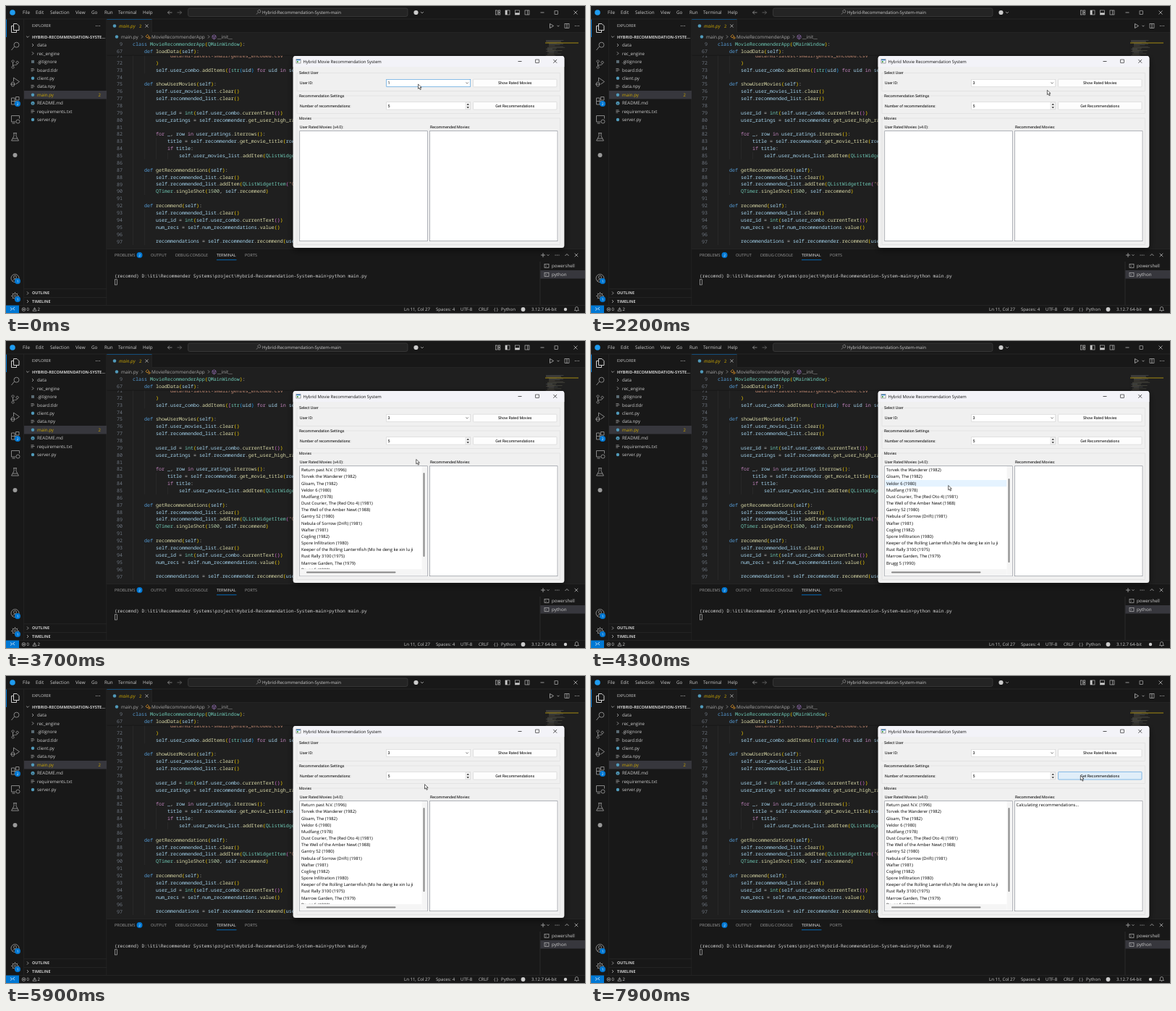
Animation, 800 px wide and 424 px high, one loop 8000 ms. Source, as an HTML page:

```html
<!DOCTYPE html>
<html lang="en">
<head>
<meta charset="utf-8">
<title>Recommender demo</title>
<style>
html, body { margin: 0; width: 100%; height: 100%; overflow: hidden; background: #181818; }
svg { display: block; width: 800px; height: 424px; }
text { white-space: pre; text-rendering: geometricPrecision; }
.ui { font-family: "Open Sans", "Noto Sans", sans-serif; }
.code { font-family: "Noto Sans Mono", "Liberation Mono", monospace; }
.form { font-family: Roboto, "Liberation Sans", sans-serif; }
</style>
</head>
<body>
<svg id="stage" viewBox="0 0 800 424" xmlns="http://www.w3.org/2000/svg"></svg>
<script>
const LOOP = 8000, STEP = 100;
const BLUE = '#0078d4', GREY = '#8c8c8c', LIGHT = '#cccccc', WARN = '#cca700';
const esc = s => String(s).replace(/&/g, '&amp;').replace(/</g, '&lt;').replace(/>/g, '&gt;');

// Drawing helpers; text is placed by the vertical centre of its capitals.
const rect = (x, y, w, h, fill, extra = '') =>
  `<rect x="${x}" y="${y}" width="${w}" height="${h}" fill="${fill}" ${extra}/>`;
const box = (x, y, w, h, fill, stroke, extra = '') =>
  rect(x, y, w, h, fill, `stroke="${stroke}" stroke-width=".6" ${extra}`);
const disc = (x, y, r, fill) => `<circle cx="${x}" cy="${y}" r="${r}" fill="${fill}"/>`;
const line = (d, stroke = LIGHT, width = .7, fill = 'none') =>
  `<path d="${d}" fill="${fill}" stroke="${stroke}" stroke-width="${width}"/>`;
const text = (x, y, s, size, fill = LIGHT, extra = '', cls = 'ui') =>
  `<text class="${cls}" x="${x}" y="${(y + size * .355).toFixed(2)}" font-size="${size}" fill="${fill}" ${extra}>${esc(s)}</text>`;
const form = (x, y, s, extra = '') => text(x, y, s, 5.3, '#000', extra, 'form');
const chevron = (x, y, c = LIGHT, r = 1.9) => line(`M${x - r} ${y - r / 2}l${r} ${r}l${r} ${-r}`, c);
const chevronRight = (x, y, c = LIGHT) => line(`M${x - 1} ${y - 2}l2 2l-2 2`, c);
const cross = (x, y, r, c = LIGHT) => line(`M${x - r} ${y - r}l${2 * r} ${2 * r}m0 ${-2 * r}l${-2 * r} ${2 * r}`, c);
const dots = (x, y) => [-2.4, 0, 2.4].map(d => disc(x + d, y, .6, LIGHT)).join('');
const badge = (x, y, n, r = 4) => disc(x, y, r, BLUE) + text(x, y, n, 4.8, '#fff', 'text-anchor="middle"');

function titleBar() {
  const menus = [[23, 'File'], [41, 'Edit'], [61, 'Selection'], [96, 'View'], [118, 'Go'],
    [136, 'Run'], [155, 'Terminal'], [189, 'Help']];
  const pane = x => box(x, 6, 6, 6, 'none', LIGHT);
  return rect(0, 0, 800, 18, '#181818') + rect(0, 17.7, 800, .6, '#2b2b2b') +
    disc(9, 9, 3.8, '#1f9cf0') +
    menus.map(([x, s]) => text(x, 9, s, 6.3)).join('') +
    line('M229.5 9h-6m2.5 -2.5l-2.5 2.5l2.5 2.5', '#aaa') +
    line('M236.5 9h6m-2.5 -2.5l2.5 2.5l-2.5 2.5', '#777') +
    box(251.5, 3, 303.5, 11.5, '#242424', '#454545', 'rx="2.5"') +
    line('M346 11.5l2 -2.3m.4 -.6a2 2 0 1 1 1.5 .7a2 2 0 0 1 -1.5 -.7', '#aaa', .6) +
    text(354, 9, 'Hybrid-Recommendation-System-main', 6.02) +
    disc(566.5, 9, 3.1, LIGHT) + chevron(575, 9) +
    box(676.5, 6, 2.5, 6, 'none', LIGHT) + box(680.5, 6, 2.3, 2.3, 'none', LIGHT) + box(680.5, 9.7, 2.3, 2.3, 'none', LIGHT) +
    pane(690) + rect(690, 6, 2.6, 6, LIGHT) +
    pane(703.5) + rect(703.5, 9.4, 6, 2.6, LIGHT) +
    pane(717) + line('M720.8 6v6') +
    line('M738.5 9h5') + box(758, 6.8, 4.5, 4.5, 'none', LIGHT) + cross(787, 9, 2.5);
}

function activityBar() {
  const icon = (y, d, c = GREY) => `<g transform="translate(12.5 ${y})">${line(d, c, .95)}</g>`;
  const ring = r => `M${-r} 0a${r} ${r} 0 1 0 ${2 * r} 0a${r} ${r} 0 1 0 ${-2 * r} 0`;
  const teeth = Array.from({ length: 8 }, (_, i) => {
    const c = Math.cos(i * Math.PI / 4), s = Math.sin(i * Math.PI / 4);
    return `M${3.6 * c} ${3.6 * s}L${5.3 * c} ${5.3 * s}`;
  }).join('');
  return rect(0, 18, 25, 395, '#181818') + rect(24.5, 18, .6, 395, '#2b2b2b') + rect(0, 18.5, 1, 24.5, BLUE) +
    icon(30.5, 'M-2 -6h4.5l3 3v6h-7.5zM-2 -3h-3v9h7v-3', '#d7d7d7') +
    icon(55, 'M-5 6l4 -5m-.5 -2.3a3.5 3.5 0 1 1 7 0a3.5 3.5 0 1 1 -7 0') +
    icon(80.5, 'M-3 -2.5v5m0 -5a1.6 1.6 0 1 1 .1 0m-.1 5a1.6 1.6 0 1 0 .1 0m6 -3.5a1.6 1.6 0 1 1 .1 0c0 3 -6 1 -6 3.5') +
    icon(105, 'M-2 -1v-5l8 5.5l-5 3.5M-5 2a2 2 0 0 1 4 0v2a2 2 0 0 1 -4 0zM-6.5 3h7') +
    icon(131, 'M-5 -4h4.5v4.5h4.5v4.5h-9zM-5 .5h4.5v4.5M1 -5.5h4.5v4.5h-4.5z') + badge(16, 135, 2) +
    icon(156, 'M1 4h-6v-8.5h11v4M-4 6h4M1.5 3.5a2.5 2.5 0 1 0 5 0a2.5 2.5 0 1 0 -5 0') +
    icon(181, 'M-2.5 -5.5h5M-1.5 -5.5v4l-3.5 6.5h10l-3.5 -6.5v-4M-3.5 2h7') +
    disc(12.5, 206, 3, '#9a9a9a') +
    icon(376, ring(5.5) + 'M-2 -1.5a2 2 0 1 0 4 0a2 2 0 1 0 -4 0M-4 4q4 -5 8 0') + badge(16, 380, 1) +
    icon(400.5, ring(3.7) + ring(1.4) + teeth) + badge(16, 405, 1);
}

function explorer() {
  const names = ['data', 'rec_engine', '.gitignore', 'board.tldr', 'client.py', 'data.npy', 'main.py',
    'README.md', 'requirements.txt', 'server.py'];
  const rows = names.map((name, i) => {
    const y = 54 + i * 11.45;
    let icon = line(`M34.5 ${y - 1.8}h4m-4 1.7h5m-5 1.7h3`, '#a8a8a8', .7);
    if (i < 2) icon = chevronRight(37, y);
    else if (name.endsWith('.py')) icon = disc(37, y, 2.2, '#519aba');
    else if (name === '.gitignore') icon = rect(35, y - 2, 4, 4, '#5b6c75');
    else if (name === 'README.md') icon = disc(37, y, 2.5, '#519aba') + rect(36.6, y - .5, .8, 2, '#181818');
    const active = name === 'main.py';
    return (active ? rect(25, y - 5.7, 114, 11.45, '#37373d') + text(127.5, y, 2, 6, WARN) : '') +
      icon + text(43, y, name, 6.2, active ? WARN : LIGHT);
  }).join('');
  return rect(25, 18, 114, 395, '#181818') + rect(138.6, 18, .6, 395, '#2b2b2b') +
    text(36, 27.5, 'EXPLORER', 5.4) + dots(127, 27.5) + chevron(30, 42.5) +
    text(36, 42.5, 'HYBRID-RECOMMENDATION-SYSTE…', 5.65, LIGHT, 'font-weight="700"') + rows +
    [['OUTLINE', 396.5], ['TIMELINE', 408]].map(([s, y]) => rect(25, y - 6, 114, .6, '#2b2b2b') +
      chevronRight(30, y) + text(36, y, s, 5.45, LIGHT, 'font-weight="700"')).join('');
}

function highlight(src) {
  const brackets = ['#ffd700', '#da70d6', '#179fff'];
  const types = ['MovieRecommenderApp', 'QMainWindow', 'QListWidgetItem', 'QTimer', 'int', 'str'];
  let depth = 0;
  return src.replace(/(["'][^"']*["']?)|\b(class|def)\b|\b(for|in|if)\b|(\d+)|(\w+)(\(?)|([()[\]])|([^\w"'()[\]]+)/g,
    (all, str, decl, flow, num, word, call, bracket) => {
      const span = (s, c) => `<tspan fill="${c}">${esc(s)}</tspan>`;
      const paren = b => {
        const level = '(['.includes(b) ? depth++ : depth = Math.max(0, depth - 1);
        return span(b, brackets[level % 3]);
      };
      if (str) return span(str, '#ce9178');
      if (decl) return span(decl, '#569cd6');
      if (flow) return span(flow, '#c586c0');
      if (num) return span(num, '#b5cea8');
      if (bracket) return paren(bracket);
      if (!word) return span(all, LIGHT);
      const color = types.includes(word) ? '#6fcab6' :
        call || word === 'recommend' ? '#dcdcaa' : '#a8d8f2';
      return span(word, color) + (call ? paren(call) : '');
    });
}

function codeLine(n, y, indent, src) {
  const size = 6.67;
  return text(161, y, n, size, '#6e7681', 'text-anchor="end"', 'code') +
    `<text class="code" x="${175 + indent * 4}" y="${(y + 2.3).toFixed(2)}" font-size="${size}">${highlight(src)}</text>`;
}

function minimap() {
  let seed = 7, map = '';
  const random = () => (seed = seed * 16807 % 2147483647) / 2147483647;
  for (let y = 47; y < 69; y += 1.1) {
    map += rect(746 + Math.floor(random() * 3) * 2, y.toFixed(2), (6 + random() * 20).toFixed(1), .5,
      ['#7d8288', '#80766a', '#86866e'][Math.floor(random() * 3)], 'opacity=".6"');
  }
  return map + rect(745, 50.2, 46, 1.6, '#8f7a14', 'opacity=".75"');
}

function editor() {
  const lines = {
    71: [12, "'data/ml-latest-small/genres_encoded.csv'"],
    72: [8, ')'],
    73: [8, 'self.user_combo.addItems([str(uid) for uid in self'],
    75: [4, 'def showUserMovies(self):'],
    76: [8, 'self.user_movies_list.clear()'],
    77: [8, 'self.recommended_list.clear()'],
    79: [8, 'user_id = int(self.user_combo.currentText())'],
    80: [8, 'user_ratings = self.recommender.get_user_high_ratings('],
    82: [8, 'for _, row in user_ratings.iterrows():'],
    83: [12, 'title = self.recommender.get_movie_title(row['],
    84: [12, 'if title:'],
    85: [16, 'self.user_movies_list.addItem(QListWidgetItem('],
    87: [4, 'def getRecommendations(self):'],
    88: [8, 'self.recommended_list.clear()'],
    89: [8, 'self.recommended_list.addItem(QListWidgetItem("Calc'],
    90: [8, 'QTimer.singleShot(1500, self.recommend)'],
    92: [4, 'def recommend(self):'],
    93: [8, 'self.recommended_list.clear()'],
    94: [8, 'user_id = int(self.user_combo.currentText())'],
    95: [8, 'num_recs = self.num_recommendations.value()'],
    97: [8, 'recommendations = self.recommender.recommend(user_id']
  };
  const lineY = n => 275.8 + (n - 92) * 9.87;
  const guide = (x, a, b) => rect(x, lineY(a) - 4.9, .5, (b - a + 1) * 9.87, '#333');
  let code = guide(175, 71, 97) + guide(191, 71, 73) + guide(191, 76, 85) + guide(191, 88, 90) +
    guide(191, 93, 97) + guide(207, 83, 85) + guide(223, 85, 85);
  for (let n = 71; n <= 97; n++) code += codeLine(n, lineY(n), ...(lines[n] || [0, '']));

  return rect(139, 18, 661, 318, '#1f1f1f') + code +
    rect(139.2, 46, 605, 22, '#1f1f1f') + rect(139.2, 67.6, 605, 1, '#181818') +
    codeLine(9, 53, 0, 'class MovieRecommenderApp(QMainWindow):') + codeLine(67, 62.7, 4, 'def loadData(self):') +
    minimap() + rect(139.2, 18.3, 661, 18, '#181818') + rect(139.2, 36, 661, .5, '#2b2b2b') +
    rect(139.2, 18.3, 62.5, 18.5, '#1f1f1f') + rect(139.2, 18, 62.5, .7, BLUE) + rect(201.4, 18.3, .5, 18, '#2b2b2b') +
    disc(150, 27.5, 2.3, '#519aba') + text(156, 27.5, 'main.py', 6.4, WARN, 'font-style="italic"') +
    text(184, 27.5, 2, 6, WARN) + cross(194.5, 27.5, 2, '#ddd') +
    line('M751.5 24.5l5 3l-5 3z') + chevron(763, 27.5, LIGHT, 1.5) +
    box(772, 24.5, 6, 6, 'none', LIGHT) + line('M775 24.5v6') + dots(789, 27.5) +
    disc(153, 42.5, 2.2, '#519aba') + text(159, 42.5, 'main.py', 6.4, '#a9a9a9') + chevronRight(188, 42.5, '#a9a9a9') +
    line('M193 42l2.5 -2.5l2 2l-2.5 2.5zM196 43h3v2h-3', '#ee9d28') +
    text(201, 42.5, 'MovieRecommenderApp', 6.4, '#a9a9a9') + chevronRight(280, 42.5, '#a9a9a9') +
    line('M285 41.3l2.5 -1.5l2.5 1.5v3l-2.5 1.5l-2.5 -1.5zl2.5 1.5l2.5 -1.5m-2.5 1.5v3', '#b180d7', .6) +
    text(292, 42.5, '__init__', 6.4, '#a9a9a9');
}

function panel() {
  const tabs = [[150, 'PROBLEMS'], [200, 'OUTPUT'], [234, 'DEBUG CONSOLE'], [291, 'TERMINAL'], [330, 'PORTS']];
  const shell = (y, name) => box(744, y - 2.5, 6, 5, 'none', LIGHT) + line(`M745.5 ${y - 1}l1.3 1.2l-1.3 1.2`, LIGHT, .5) +
    text(754, y, name, 6.25);
  return rect(139.2, 335.5, 661, 78, '#181818') + rect(139.2, 335.3, 661, .6, '#2b2b2b') +
    tabs.map(([x, s]) => text(x, 344, s, 5.5, s === 'TERMINAL' ? '#e7e7e7' : '#9d9d9d')).join('') +
    rect(291, 350.3, 27.5, .8, BLUE) + badge(184.5, 344, 2) +
    line('M739 344h6m-3 -3v6') + chevron(749, 344, LIGHT, 1.5) + dots(761.5, 344) +
    line('M772.5 345l2.5 -2.5l2.5 2.5') + cross(788, 344, 2.3) +
    text(150, 373, '(recomnd) D:\\iti\\Recommender Systems\\project\\Hybrid-Recommendation-System-main>python main.py',
      6.25, '#d6d6d6', '', 'code') + box(150.4, 377.8, 3.2, 7.2, 'none', '#ccc') +
    rect(737.7, 353, .6, 60, '#3a3a3a') + rect(738.3, 365, 62, 11.5, '#37373d') +
    shell(359, 'powershell') + shell(371, 'python');
}

function statusBar() {
  const items = [[550, 'Ln 11, Col 27'], [594, 'Spaces: 4'], [628, 'UTF-8'], [653, 'CRLF'], [674, '{ }'],
    [684, 'Python'], [726, '3.12.7 64-bit'], [28.5, '0'], [43.5, '2']];
  return rect(0, 413, 800, 11, '#181818') + rect(0, 413, 800, .6, '#2b2b2b') + rect(0, 413.5, 18, 10.5, BLUE) +
    line('M6 416.5l2.5 2l-2.5 2m6 -4.5l-2.5 2l2.5 2', '#fff') +
    items.map(([x, s]) => text(x, 419, s, 6.05)).join('') +
    `<circle cx="24.5" cy="419" r="2.4" fill="none" stroke="${LIGHT}" stroke-width=".6"/>` + cross(24.5, 419, 1) +
    line('M39.5 416.5l2.6 4.7h-5.2zM39.5 418v1.7', LIGHT, .6) +
    disc(714.5, 419, 2.9, LIGHT) + disc(773, 419, 2.2, LIGHT) +
    line('M785.5 420.5h6l-1 -1.5v-1.5a2 2 0 0 0 -4 0v1.5zM787.8 421.7h1.4', LIGHT, .6);
}

function windowFrame() {
  const group = (y, h, label, gap) => box(402, y, 363.5, h, 'none', '#dadada') + rect(404, y - 2, gap, 4, '#f0f0f0') + form(405, y, label);
  return `<g filter="url(#shadow)">${rect(396.7, 69, 374.6, 265, '#f0f0f0', 'rx="3.5"')}</g>` +
    '<path d="M396.7 84V72.5a3.5 3.5 0 0 1 3.5 -3.5h367.6a3.5 3.5 0 0 1 3.5 3.5V84z" fill="#f3f3f8"/>' +
    box(401, 73.5, 6, 5.5, '#fff', '#666') + rect(401.3, 73.8, 5.4, 1.4, '#2f7fc8') + rect(402, 76, 2, 2, '#58a55c') +
    text(410.5, 76.5, 'Hybrid Movie Recommendation System', 5.9, '#111') +
    line('M707.5 76.5h5', '#111') + box(731.7, 74, 4.6, 4.6, 'none', '#111') + cross(758.7, 76.3, 2.4, '#111') +
    group(92.5, 25, 'Select User', 29) + group(124, 24.5, 'Recommendation Settings', 65) + group(155, 174.5, 'Movies', 18) +
    form(406, 106.5, 'User ID:') + form(406, 137.7, 'Number of recommendations:') +
    form(406, 166.7, 'User Rated Movies (≥4.0):') + form(586, 166.7, 'Recommended Movies:') +
    box(525.7, 132.7, 116, 10.3, '#fff', '#d2d2d2') + form(527.5, 138, 5) + box(635, 133, 6.4, 9.7, '#f4f4f4', '#d8d8d8') +
    '<path d="M636.5 136.8l1.7 -2l1.7 2zM636.5 139.2l1.7 2l1.7 -2z" fill="#222"/>' +
    box(405.8, 172.7, 176.6, 152, '#fff', '#828790') + box(585.6, 172.7, 176.4, 152, '#fff', '#828790');
}

const MOVIES = ['Return past N.V. (1996)', 'Torvek the Wanderer (1982)', 'Gloam, The (1982)', 'Veldor 6 (1980)',
  'Mudfang (1978)', 'Dust Courier, The (Red Oto 4) (1981)', 'The Well of the Amber Newt (1988)', 'Gantry 52 (1980)',
  'Nebula of Sorrow (Drift) (1981)', 'Wafter (1981)', 'Cogling (1982)', 'Spore Infiltration (1980)',
  'Keeper of the Rolling Lanternfish (Mo he deng ke xin lu ji', 'Rust Rally 3100 (1975)',
  'Marrow Garden, The (1979)', 'Brugg 5 (1990)'];

// Pointer stops: time, x, y.
const POINTER = [[0, 569.5, 108], [500, 569.5, 108], [1200, 562, 127.7], [1700, 562, 127.7], [2600, 679.3, 108],
  [3300, 679.3, 108], [4000, 493.7, 199.5], [5200, 493.7, 199.5], [5900, 578.5, 149.7], [6400, 676.3, 137.5], [LOOP, 676.3, 137.5]];

function pointerAt(t) {
  const i = POINTER.findIndex(p => p[0] > t);
  const [t0, x0, y0] = POINTER[i - 1], [t1, x1, y1] = POINTER[i];
  const k = (t - t0) / (t1 - t0), e = k * k * (3 - 2 * k);
  return [x0 + (x1 - x0) * e, y0 + (y1 - y0) * e];
}

const within = (px, py, x, y, w, h) => px >= x && px < x + w && py >= y && py < y + h;

function button(y, label, px, py, pressed) {
  const hover = within(px, py, 645.6, y, 115.4, 10.6);
  return box(645.6, y, 115.4, 10.6, hover ? (pressed ? '#cce4f7' : '#e0eef9') : '#fdfdfd', hover ? '#3d94da' : '#d2d2d2', 'rx=".8"') +
    form(703.3, y + 5.3, label, 'text-anchor="middle"');
}

function combo(user, open, px, py) {
  const hover = open || within(px, py, 525.7, 101.3, 116, 10);
  return box(525.7, 101.3, 116, 10, open ? '#cce4f7' : '#fff', hover ? '#3d94da' : '#d2d2d2') +
    form(527.5, 106.5, user) + chevron(637.2, 106.3, '#444', 1.7);
}

function dropdown(py) {
  const pitch = 6.68, top = 111.1;
  const picked = Math.max(0, Math.floor((py - top) / pitch));
  let out = rect(527.5, 113, 116, 66.5, '#000', 'opacity=".35"') + box(525.7, top, 116, 67, '#fff', '#555');
  for (let i = 0; i < 10; i++) {
    const y = top + pitch * i, on = i === picked;
    if (on) out += rect(526, y, 107.5, pitch, '#0078d7');
    out += text(527.5, y + pitch / 2, i + 1, 5.3, on ? '#fff' : '#000', '', 'form');
  }
  return out + rect(634, top + .4, 7.4, 66.3, '#f3f3f3') + rect(636.2, 120, 2.8, 9, '#858585', 'rx="1"');
}

function movieList(scroll, px, py) {
  const pitch = 9.17, top = 173.6;
  const hovered = within(px, py, 406, top, 168, 141) ? Math.floor((py - top) / pitch) : -1;
  const rows = MOVIES.slice(scroll).map((name, i) =>
    (i === hovered ? rect(406.2, top + i * pitch, 168.3, pitch, '#e5f3ff') : '') +
    text(408, top + (i + .5) * pitch, name, 5.9, '#000')).join('');
  return `<g clip-path="url(#listClip)">${rows}</g>` +
    rect(574.6, 173, 7.5, 151.4, '#f5f5f5') + rect(406.1, 315.2, 168.5, 9.2, '#f5f5f5') +
    rect(576.5, 182 + scroll * 8, 2, 116, '#858585', 'rx="1"') + rect(415, 318.4, 123.5, 2, '#858585', 'rx="1"');
}

const stage = document.getElementById('stage');
stage.innerHTML = `<defs>
  <clipPath id="listClip"><rect x="406" y="173" width="168.5" height="142"/></clipPath>
  <filter id="shadow" x="-10%" y="-10%" width="120%" height="125%">
    <feDropShadow dx="0" dy="3" stdDeviation="5" flood-color="#000" flood-opacity=".55"/>
  </filter></defs>` + rect(0, 0, 800, 424, '#181818') + editor() + panel() + explorer() + activityBar() +
  titleBar() + statusBar() + windowFrame() + '<g id="live"></g>' +
  '<path id="pointer" d="M0 0v6.3l1.5 -1.3l1.2 2.6l1.2 -.6l-1.2 -2.5h2z" fill="#fff" stroke="#000" stroke-width=".6"/>';
const live = document.getElementById('live'), pointer = document.getElementById('pointer');

function update(t) {
  const [px, py] = pointerAt(t);
  const open = t >= 700 && t < 1700;
  const scroll = t >= 4100 && t < 4900 ? 1 : 0;
  live.innerHTML = combo(t < 1700 ? 1 : 3, open, px, py) +
    button(101.2, 'Show Rated Movies', px, py, t === 3200) +
    button(132.4, 'Get Recommendations', px, py, t === 6700) +
    (t >= 3300 ? movieList(scroll, px, py) : '') +
    (t >= 6800 ? text(587.5, 178.2, 'Calculating recommendations...', 5.9, '#000') : '') +
    (open ? dropdown(py) : '');
  pointer.setAttribute('transform', `translate(${px.toFixed(2)} ${py.toFixed(2)})`);
}

let start, shown = -1;
function tick(now) {
  start ??= now;
  const t = Math.floor((now - start) % LOOP / STEP) * STEP;
  if (t !== shown) update(shown = t);
  requestAnimationFrame(tick);
}
update(0);
requestAnimationFrame(tick);
</script>
</body>
</html>
```
